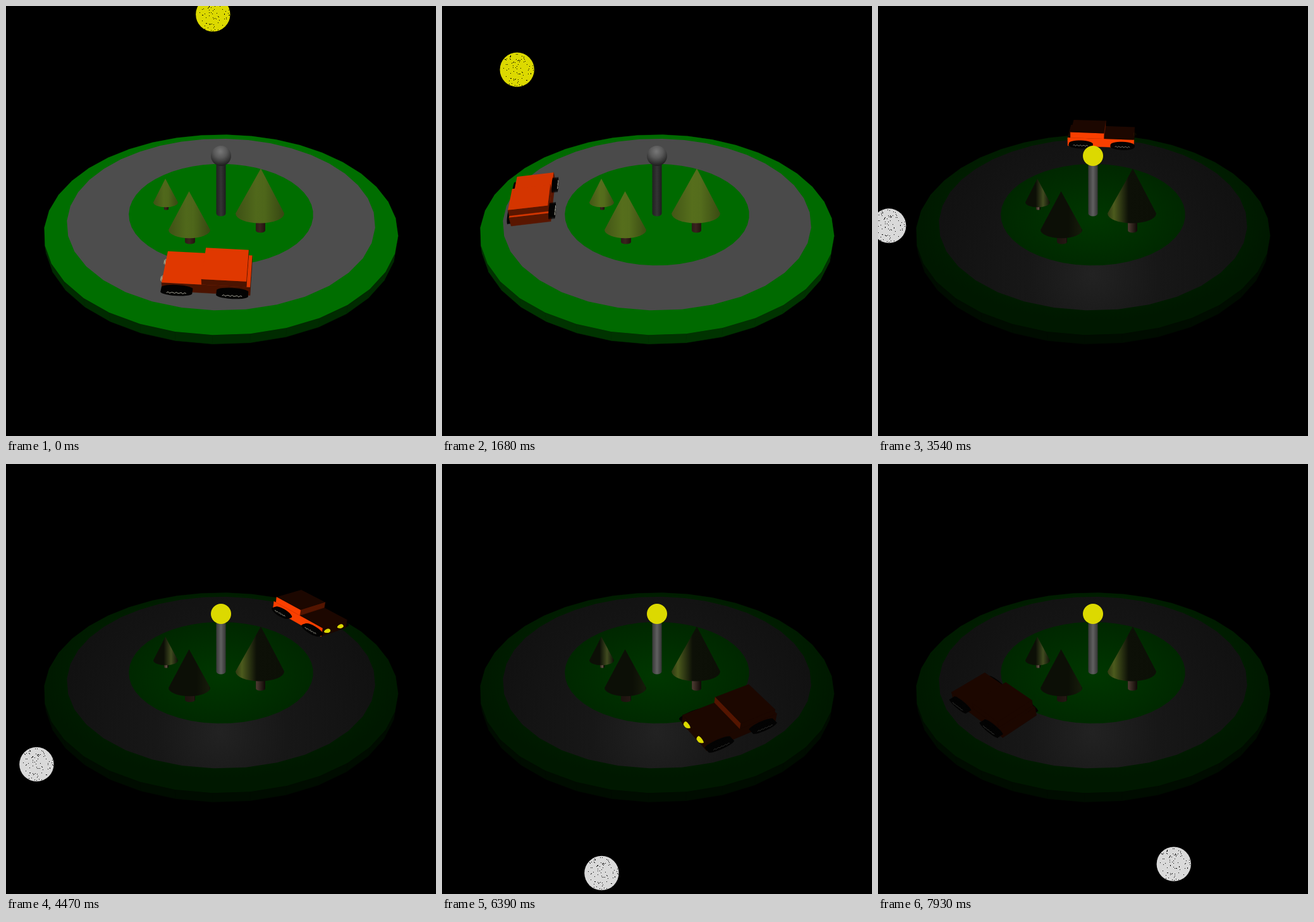
Animation of 680 by 680 pixels, one loop 8000 ms. Source, as an HTML page with a canvas:

```html
<!DOCTYPE html>
<html lang="en">
<head>
<meta charset="utf-8">
<title>Day and night drive</title>
<style>
html, body { margin: 0; height: 100%; overflow: hidden; background: #000; }
canvas { display: block; }
</style>
</head>
<body>
<canvas id="stage" width="680" height="680"></canvas>
<script>
const ctx = document.getElementById('stage').getContext('2d');
const TAU = Math.PI * 2, RAD = Math.PI / 180;
const LOOP = 8000, STEP = 77, LAST_STEP = 103;

// Camera: tilted view in which one unit is one pixel at the ring's centre.
const DIST = 1107.7, TILT_SIN = 0.5615, TILT_COS = 0.827, SHIFT = -18.6;
const CAMERA_Z = 926;

const ROAD_IN = 145, ROAD_OUT = 240, LAWN = 275.5, LAWN_Y = -9.7, BASE_Y = -25.5;
const CAR_PATH = 192, BANK = 0.1, SLOPE = 0.018;

function project([x, y, z]) {
  const k = DIST / (DIST - z * TILT_COS - y * TILT_SIN);
  return [340 + k * x, 340 + k * (SHIFT + z * TILT_SIN - y * TILT_COS)];
}

const rgb = (r, g, b) => `rgb(${Math.round(r)},${Math.round(g)},${Math.round(b)})`;
const carPaint = level => rgb(level, level / 4, 0);

function trace(points) {
  points.forEach(([x, y], i) => i ? ctx.lineTo(x, y) : ctx.moveTo(x, y));
  ctx.closePath();
}

function fill(points, color, seam) {
  ctx.beginPath();
  trace(points);
  ctx.fillStyle = color;
  ctx.fill();
  if (seam) {
    ctx.strokeStyle = color;
    ctx.lineWidth = 0.6;
    ctx.stroke();
  }
}

function circle(x, y, r, color) {
  ctx.beginPath();
  ctx.arc(x, y, r, 0, TAU);
  ctx.fillStyle = color;
  ctx.fill();
}

function ring(radius, y, count) {
  return Array.from({ length: count }, (_, i) => {
    const a = -2.25 * RAD + i * TAU / count;
    return project([radius * Math.sin(a), y, radius * Math.cos(a)]);
  });
}

function addStops(gradient, stops) {
  stops.forEach(([at, color]) => gradient.addColorStop(at, color));
  return gradient;
}
const across = (x0, x1, ...stops) => addStops(ctx.createLinearGradient(x0, 0, x1, 0), stops);
const around = (x, y, r, ...stops) => addStops(ctx.createRadialGradient(x, y, 0, x, y, r), stops);

const lawnTop = ring(LAWN, LAWN_Y, 36), lawnBase = ring(LAWN, BASE_Y, 36);
const roadEdge = ring(ROAD_OUT, 0, 36), roadHole = ring(ROAD_IN, 0, 48);

function drawIsland({ night, high }) {
  const side = night ? '#000c00' : rgb(0, 43 + 28 * (1 - high), 0);
  lawnTop.forEach((p, i) => {
    const j = (i + 1) % lawnTop.length;
    fill([p, lawnTop[j], lawnBase[j], lawnBase[i]], side, true);
  });

  ctx.beginPath();
  trace(lawnTop);
  ctx.save();
  ctx.translate(340, 335);
  ctx.scale(1, 0.57);
  ctx.fillStyle = night
    ? around(0, 0, 285, [0, '#003700'], [0.5, '#002800'], [0.8, '#001d00'], [1, '#001800'])
    : rgb(0, 96 + 14 * high, 0);
  ctx.fill();
  ctx.restore();

  ctx.beginPath();
  trace(roadEdge);
  trace(roadHole);
  const grey = 67 + 10 * high;
  ctx.fillStyle = night
    ? around(340, 425, 260, [0, '#222222'], [0.4, '#171717'], [1, '#111111'])
    : rgb(grey, grey, grey);
  ctx.fill('evenodd');
}

function drawLamp({ night }) {
  const shades = night ? ['#383838', '#606060', '#343434'] : ['#202020', '#343434', '#1c1c1c'];
  ctx.fillStyle = across(332.5, 347.5, [0, shades[0]], [0.5, shades[1]], [1, shades[2]]);
  ctx.beginPath();
  ctx.rect(332.5, 245, 15, 83);
  ctx.ellipse(340, 328, 7.5, 4.5, 0, 0, TAU);
  ctx.fill();
  circle(340, 237, 16, night ? '#dcd900'
    : around(339, 230, 23, [0, '#777777'], [0.45, '#585858'], [1, '#1c1c1c']));
}

// lit: where on the cone the lamp falls at night; bark: trunk colour there
const trees = [
  { x: 252.5, top: 273, base: 310.5, half: 19.5, trunk: 3.5, foot: 321, lit: 0.72, glow: '#414b20', bark: '#6b5a4c' },
  { x: 401.5, top: 257, base: 328, half: 38.5, trunk: 7.5, foot: 355, lit: 0.13, glow: '#4c5b1d', bark: '#4c3b31' },
  { x: 290, top: 293, base: 354, half: 33, trunk: 8, foot: 373, lit: 0.97, glow: '#161b0a', bark: '#241813' }
];

function drawTree(tree, { night, high }) {
  const { x, top, base, half, trunk, foot, lit, glow, bark } = tree;
  ctx.fillStyle = night
    ? across(x - trunk, x + trunk, [0, '#1c120e'], [lit, bark], [1, '#120b08'])
    : across(x - trunk, x + trunk, [0, '#2b1a16'], [0.5, '#3a231e'], [1, '#24140f']);
  ctx.beginPath();
  ctx.rect(x + 1 - trunk, base, trunk * 2, foot - base);
  ctx.ellipse(x + 1, foot, trunk, trunk * 0.45, 0, 0, TAU);
  ctx.fill();

  const low = 1 - high;
  const leaf = k => rgb((80 + 22 * low) * k, (104 + 22 * low) * k, (27 + 5 * low) * k);
  const edge = lit < 0.5 ? '#303a12' : '#0c0f06';
  ctx.fillStyle = night
    ? across(x - half, x + half, [0, edge], [Math.max(0, lit - 0.3), edge],
        [lit, glow], [Math.min(1, lit + 0.3), '#0d1007'], [1, '#0c0f06'])
    : across(x - half, x + half, [0, leaf(0.78)], [0.42, leaf(1)], [0.6, leaf(0.98)], [1, leaf(0.68)]);
  ctx.beginPath();
  ctx.moveTo(x + half, base);
  ctx.ellipse(x, base, half, half * 0.4, 0, 0, Math.PI);
  ctx.lineTo(x + (x > 350 ? 1.5 : -0.5), top);
  ctx.closePath();
  ctx.fill();
}

function drawCar(angle, { night, high, sun }) {
  const sin = Math.sin(angle), cos = Math.cos(angle);
  const center = [-CAR_PATH * sin, CAR_PATH * cos];

  // along: towards the nose, out: away from the island's centre.
  // The car leans outwards and its path rises towards the back.
  function place(along, out, y) {
    const lean = out + (y - 25) * BANK;
    const x = center[0] - along * cos - lean * sin;
    const z = center[1] - along * sin + lean * cos;
    return [x, y - out * BANK + 2.5 - z * SLOPE, z];
  }
  const at = (along, out, y) => project(place(along, out, y));
  const facing = (along, out) => {
    const [x, , z] = place(along, out, 25);
    return (x - center[0]) * -x + (z - center[1]) * (CAMERA_Z - z) > 0;
  };

  function sideLevel(na, no, cab) {
    if (night) return no < 0 ? 250 : na > 0 && cab ? 84 : 28;
    const nx = -na * cos - no * sin;
    return 75 + 50 * (1 - high) + 90 * Math.max(0, -nx * Math.sin(sun));
  }

  function box(back, front, half, low, top, cab) {
    const corners = [[front, -half], [front, half], [back, half], [back, -half]];
    const normals = [[1, 0], [0, 1], [-1, 0], [0, -1]];
    normals.forEach(([na, no], i) => {
      const a = corners[i], b = corners[(i + 1) % 4];
      if (!facing(na ? a[0] : 0, no ? a[1] : 0)) return;
      fill([at(...a, low), at(...b, low), at(...b, top), at(...a, top)],
        carPaint(sideLevel(na, no, cab)), true);
    });
    fill(corners.map(c => at(...c, top)), carPaint(night ? 28 : 180 + 44 * high));
  }

  const oval = point => Array.from({ length: 28 }, (_, i) =>
    point(Math.cos(i * TAU / 28), Math.sin(i * TAU / 28)));

  function wheels(side, near) {
    for (const along of [40, -33]) {
      for (let out = 27; out <= 35; out += 2) {
        fill(oval((c, s) => at(along + 21 * c, side * out, 20.5 + 6 * s)), '#030303');
      }
      if (!near) continue;
      ctx.beginPath();
      for (let i = 0; i <= 12; i++) {
        const wave = Math.sin(i * 2.4) * 1.3;
        ctx.lineTo(...at(along - 13 + i * 26 / 12, side * 35.5, 20.5 + wave));
      }
      ctx.strokeStyle = night ? (side < 0 ? '#77776e' : '#2c2c2a') : '#aaa99c';
      ctx.lineWidth = 1;
      ctx.stroke();
    }
  }

  function headlights() {
    for (const out of [-17, 14.5]) {
      for (let i = 0; i < 4; i++) {
        const size = 1 - i * i * 0.04;
        fill(oval((c, s) => at(59 + i * 1.4, out + 6.5 * size * c, 24 + 3 * size * s)),
          night ? '#dcd900' : '#c9c29b');
      }
    }
  }

  const outerNear = facing(0, 29), noseNear = facing(59, 0);
  wheels(outerNear ? -1 : 1, false);
  if (!noseNear) headlights();
  box(-56, 59.5, 29.5, 17, 32, false);
  box(-51, 7, 29.5, 32, 42, true);
  wheels(outerNear ? 1 : -1, true);
  if (noseNear) headlights();
}

function random(seed) {
  return () => (seed = (seed * 16807) % 2147483647) / 2147483647;
}

function drawOrb({ night, sun }) {
  const x = 340 - 323 * Math.sin(sun), y = 336 - 323 * Math.cos(sun);
  circle(x, y, 27.2, night ? '#d9d9d9' : '#dcd900');
  const next = random(4711);
  ctx.fillStyle = '#000';
  for (let i = 0; i < 85; i++) {
    const a = next() * TAU, r = 26 * Math.sqrt(next());
    ctx.fillRect(Math.round(x + r * Math.cos(a)), Math.round(y + r * Math.sin(a)), 1, 1);
  }
}

function draw(step) {
  const sun = (2.25 + 1.952 * step) * RAD;
  const carAngle = (4.7 + 3.9 * step) * RAD;
  const sky = { sun, high: Math.cos(sun), night: step >= 46 };
  const carBehind = Math.cos(carAngle) < 0;

  ctx.fillStyle = '#000';
  ctx.fillRect(0, 0, 680, 680);
  drawOrb(sky);
  drawIsland(sky);
  if (carBehind) drawCar(carAngle, sky);
  drawLamp(sky);
  trees.forEach(tree => drawTree(tree, sky));
  if (!carBehind) drawCar(carAngle, sky);
}

const start = performance.now();
function tick() {
  const time = (performance.now() - start) % LOOP;
  draw(Math.min(LAST_STEP, Math.floor((time + 9) / STEP)));
  requestAnimationFrame(tick);
}
tick();
</script>
</body>
</html>
```
